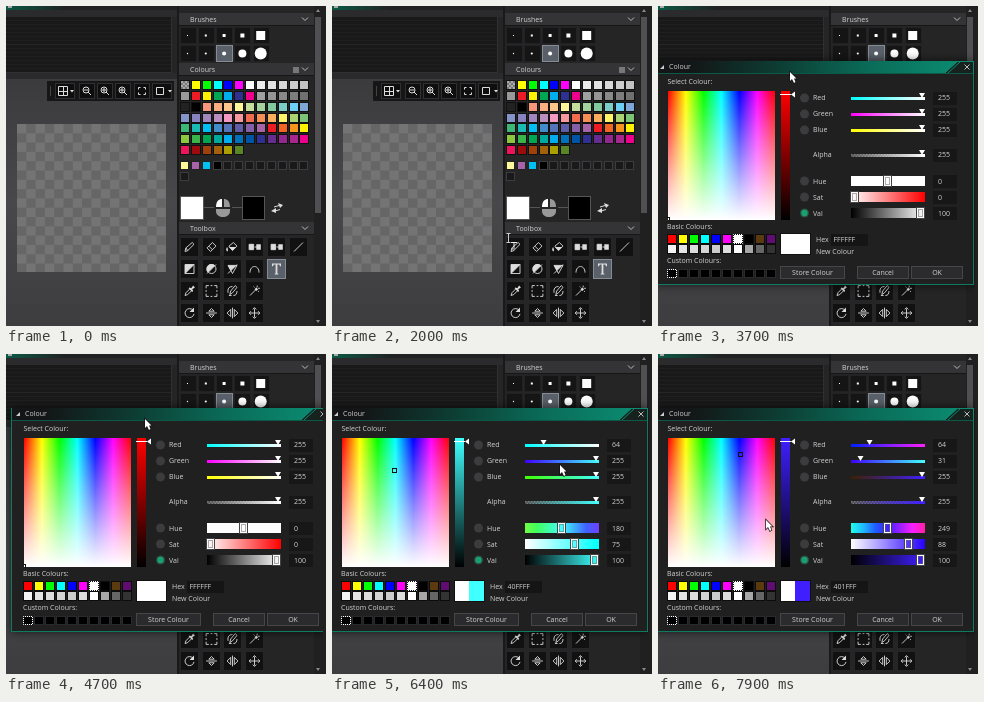
An HTML page with a canvas that plays this animation: 320x320 px, repeating every 8000 ms.

```html
<!DOCTYPE html>
<html lang="en">
<head>
<meta charset="utf-8">
<title>Colour picker</title>
<style>
html, body { margin: 0; width: 100%; height: 100%; overflow: hidden; background: #242425; }
canvas { display: block; width: 320px; height: 320px; }
</style>
</head>
<body>
<canvas id="stage" width="320" height="320"></canvas>
<script>
const g = document.getElementById('stage').getContext('2d');
const LOOP = 8000, STEP = 100;

// [time, x, y] of the pointer tip
const pointer = [
  [1500, 150, 322], [2000, 176, 232], [2300, 177, 232], [2600, 187, 202], [2900, 187, 202],
  [3600, 132, 66], [3700, 132, 66], [4700, 139, 65], [4900, 131, 65], [5100, 131, 65],
  [5400, 238, 96], [5600, 264, 90], [5700, 264, 90], [6100, 212, 90], [6200, 212, 90],
  [6400, 228, 111], [6700, 264, 106], [6800, 264, 106], [7500, 203, 106], [7600, 203, 106],
  [7900, 108, 166]
];
const dialogShift = [[3700, 0, 1], [4700, 8, 0], [4900, 0, 0]];
const OPEN = 2900;

const palette = [
  '- ff0 0f0 0ff 00f f0f fff ebebeb e1e1e1 d7d7d7 ccc c2c2c2',
  '999 ed1c24 fff200 00a651 00aeef 2e3192 ec008c a0a0a0 959595 898989 7d7d7d 707070',
  '222 000 f7977a f9ad81 fdc68a fff79a c4df9b a2d39c 82ca9d 7bcdc8 6ecff6 7ea7d8',
  '8493ca 8882be a187be bc8dbf f49ac2 f6989d f26c4f f68e55 fbaf5c fff467 acd372 7cc576',
  '3bb878 1abbb4 00bff3 438cca 5574b9 605ca8 855fa8 a763a8 ed1c24 f26522 f7941d fff200',
  '8dc73f 39b54a 00a651 00a99d 00aeef 0072bc 0054a5 2e3192 662d91 92278f a7278f ec008c',
  'ed145b 9e0b0f a0410d a36209 aba000 598527'
].map(row => row.split(' '));
const basic = [
  'f00 ff0 0f0 0ff 00f f0f fff 000 5c3a10 600c70',
  'f4f4f4 e4e4e4 ddd d4d4d4 ccc ddd fff a8a8a8 666 333'
].map(row => row.split(' '));

const lerp = (a, b, k) => a + (b - a) * k;

function at(keys, t) {
  if (t <= keys[0][0]) return keys[0].slice(1);
  const i = keys.findIndex(k => k[0] > t);
  if (i < 0) return keys[keys.length - 1].slice(1);
  const [a, b] = [keys[i - 1], keys[i]];
  const k = (t - a[0]) / (b[0] - a[0]);
  return [lerp(a[1], b[1], k), lerp(a[2], b[2], k)];
}

function ramp(t, from, to) {
  return Math.min(1, Math.max(0, (t - from) / (to - from)));
}

function box(x, y, w, h, fill, line) {
  if (fill) { g.fillStyle = fill; g.fillRect(x, y, w, h); }
  if (line) { g.strokeStyle = line; g.lineWidth = 1; g.strokeRect(x + .5, y + .5, w - 1, h - 1); }
}

function text(s, x, y, align = 'left', color = '#d2d2d2') {
  g.font = '7px "Open Sans", sans-serif';
  g.textAlign = align;
  g.fillStyle = color;
  g.fillText(s, x, y);
}

function disc(x, y, r, fill) {
  g.fillStyle = fill;
  g.beginPath();
  g.arc(x, y, r, 0, 7);
  g.fill();
}

function icon(x, y, line, solid, color = '#ddd', size = 1) {
  g.save();
  g.translate(x, y);
  g.scale(size, size);
  g.strokeStyle = g.fillStyle = color;
  g.lineWidth = 1;
  if (line) g.stroke(new Path2D(line));
  if (solid) g.fill(new Path2D(solid));
  g.restore();
}

function gradient(x0, y0, x1, y1, colors) {
  const p = g.createLinearGradient(x0, y0, x1, y1);
  colors.forEach((c, i) => p.addColorStop(i / (colors.length - 1), c));
  return p;
}

function checker(x, y, w, h, size, a, b) {
  box(x, y, w, h, a);
  g.fillStyle = b;
  for (let j = 0; j * size < h - .1; j++)
    for (let i = j % 2; i * size < w - .1; i += 2)
      g.fillRect(x + i * size, y + j * size, Math.min(size, w - i * size), Math.min(size, h - j * size));
}

const rgb = c => `rgb(${c.map(Math.round)})`;

function hsv(h, s, v) {
  return rgb([5, 3, 1].map(n => {
    const k = (n + h / 60 + 12) % 6;
    return 255 * v * (1 - s * Math.max(0, Math.min(k, 4 - k, 1)));
  }));
}

function toHsv([r, gr, b]) {
  const max = Math.max(r, gr, b), d = max - Math.min(r, gr, b);
  const h = !d ? 0 : max === r ? (gr - b) / d : max === gr ? 2 + (b - r) / d : 4 + (r - gr) / d;
  return [(h * 60 + 360) % 360, max ? d / max : 0, max / 255];
}

function header(label, y) {
  box(173, y, 135, 12, '#343436');
  box(173, y + 12, 135, 1, '#161617');
  text(label, 184, y + 9);
  icon(299, y + 6, 'M-3-1.5L0 1.5 3-1.5', '', '#bbb');
}

function workspace() {
  box(0, 0, 320, 320, '#252526');
  box(0, 0, 172, 4, gradient(0, 0, 60, 0, ['#0b5a45', '#202122']));
  box(0, 4, 172, 7, '#2b2b2d');
  box(2, 0, 4, 2, '#aaa');
  box(0, 11, 166, 56, '#19191a');
  g.fillStyle = '#1f1f20';
  for (let y = 14; y < 66; y += 4) g.fillRect(0, y, 165, 1);
  box(0, 38, 165, 1, '#262627');
  box(0, 66, 166, 1, '#303032');
  box(165, 11, 1, 56, '#303032');
  box(0, 67, 171, 6, '#2a2a2c');
  box(0, 73, 171, 247, gradient(0, 73, 0, 320, ['#3b3b3e', '#48484a', '#3d3d40']));
  checker(11, 118, 149, 148, 9.3, '#666667', '#747475');

  box(41, 75, 127, 20, '#161617');
  box(44, 80, 1, 10, '#444');
  [[49, 20], [73, 16], [91, 16], [109, 16], [128, 16], [146, 20]].forEach(([x, w]) => box(x, 77, w, 16, '#0e0e0f', '#303032'));
  icon(57, 85, 'M-4.5-4.5H4.5V4.5H-4.5zM.5-4V4M-4 .5H4');
  icon(66, 85, '', 'M-2-1H2L0 1.5z');
  ['M-3-1H1', 'M-3-1H1M-1-3V1', 'M-3-1H1M-1-3V1'].forEach((sign, i) =>
    icon(81 + i * 18, 85, 'M2-1A3 3 0 1 1-4-1 3 3 0 1 1 2-1M1 1L4 4' + sign));
  icon(136, 85, 'M-3.5-1.5V-3.5H-1.5M1.5-3.5H3.5V-1.5M3.5 1.5V3.5H1.5M-1.5 3.5H-3.5V1.5');
  icon(154, 85, 'M-3.5-3.5H3.5V3.5H-3.5z');
  icon(164, 85, '', 'M-2-1H2L0 1.5z');
}

function sidebar() {
  box(171, 0, 2, 320, '#19191a');
  box(308, 0, 12, 320, '#202021');
  box(309, 11, 6, 196, '#505052');
  icon(312, 5, '', 'M-2 1H2L0-2z', '#888');
  icon(312, 315, '', 'M-2-1H2L0 2z', '#888');

  header('Brushes', 7);
  for (let i = 0; i < 10; i++) {
    const col = i % 5, x = 181.5 + col * 18.3, y = i < 5 ? 29.5 : 47.5;
    box(Math.round(x - 8), y - 8.5, 17, 17, i === 7 ? '#596069' : '#151516', i === 7 ? '#858c95' : '#222224');
    const r = i < 5 ? [.5, 1, 1.5, 2, 4.5][col] : [.7, 1.1, 2, 4, 6][col];
    if (i < 5) box(x - r, y - r, 2 * r, 2 * r, '#fff');
    else disc(x, y, r, '#fff');
  }

  header('Colours', 57);
  icon(290, 64, 'M-3-2H3M-3 0H3M-3 2H3', '', '#bbb');
  palette.forEach((row, j) => row.forEach((c, i) => {
    const x = Math.round(174 + i * 10.85), y = Math.round(74 + j * 10.85);
    box(x, y, 10, 10, '#111');
    if (c === '-') checker(x + 1, y + 1, 8, 8, 2, '#777', '#aaa');
    else box(x + 1, y + 1, 8, 8, '#' + c);
  }));
  const used = ['#fff79a', '#a763a8', '#00bff3', '#000'];
  for (let i = 0; i < 13; i++)
    box(Math.round(174 + i % 12 * 10.85), i < 12 ? 155 : 166, 9, 9, used[i] || '#19191a', i < 3 ? '#222' : '#3c3c3e');

  box(198, 201, 38, 1, '#555');
  box(174, 190, 24, 24, '#fff', '#555');
  box(236, 190, 23, 24, '#000', '#555');
  box(208, 192, 18, 20, '#252526');
  icon(217, 202, '', 'M-1-9V-1H-7C-7-7-4-9-1-9z', '#fff');
  icon(217, 202, '', 'M1-9V-1H7C7-7 4-9 1-9zM-7 1H7V3C7 11-7 11-7 3z', '#999');
  icon(271, 202, 'M-3-1L2-2.5M-2 3L3 1.5', 'M1-5L6-3 3 0zM-1 0L-6 3-1 5z');

  header('Toolbox', 216);
  toolbox();
}

function toolbox() {
  const halfCut = 'M-5 5L5-5';
  const replace = ['M-6-3H-1V3H-6zM0 0H3', 'M-6-3H-1V3H-6zM2-3H7V3H2z'];
  const tools = [
    ['M-5 5L-4 1 3-5 5-3-2 4zM-4 1L-2 4'],
    ['M-5 1L1-5 5-1-1 5zM-3-1L1 3'],
    ['M-4-1L1-5 5-1 0 4z', 'M-4 0L4 0 0 4zM-6 0Q-4 4-6 5Q-8 3-6 0'],
    replace, replace,
    ['M-5 5L5-5'],
    ['M-5-5H5V5H-5z' + halfCut, 'M-5-5H5L-5 5z'],
    ['M5 0A5 5 0 1 1-5 0 5 5 0 1 1 5 0' + halfCut, 'M-4 4A5 5 0 0 1 4-4z'],
    ['M-5-4H5L0 5z' + halfCut, 'M-5-4H4L-2 2z'],
    ['M-5 4C-5-5 5-5 5 4'],
    ['', 'M-5-6H5V-3H4L3-5H1V5L2 5V6H-2V5L-1 5V-5H-3L-4-3H-5z'],
    ['M-5 5L-4 2 1-3 3-1-2 4z', 'M0-4L2-3 4-6 6-4 3-2 4 0 3 1-1-3z'],
    ['M-6-3V-6H-3M-1-6H1M3-6H6V-3M6-1V1M6 3V6H3M1 6H-1M-3 6H-6V3M-6 1V-1'],
    ['M-5 2Q-6-5 0-5M-4 5H-1M5 0Q5 5 1 5M-3 4L-2 0 3-6 5-4 0 2z'],
    ['M-5 5L2-2M3-6V-4M6-3H4M-1-5L0-4M5 1L4 0', 'M0-2L2-4 4-2 2 0z'],
    ['M4-3A5 5 0 1 0 5 1', 'M5-6V-1H0z'],
    ['M-6 0H6M-3-2L0-5 3-2zM-3 2L0 5 3 2z'],
    ['M0-6V6M-2-4L-6 0-2 4zM2-4L6 0 2 4z'],
    ['M-5 0H5M0-5V5M-2-4L0-6 2-4M-2 4L0 6 2 4M-4-2L-6 0-4 2M4-2L6 0 4 2']
  ];
  const rows = [6, 5, 4, 4];
  let n = 0;
  rows.forEach((count, j) => {
    for (let i = 0; i < count; i++, n++) {
      const x = Math.round(183 + i * 21.7), y = 241 + j * 22, on = n === 10;
      box(x - 9, y - 10, 19, 20, on ? '#596069' : '#111112', on ? '#858c95' : '#262628');
      icon(x + .5, y, tools[n][0], tools[n][1], '#ddd', .9);
    }
  });
}

function slider(label, y, value, shown, colors, isAlpha) {
  text(label, 155, y + 2);
  if (isAlpha) checker(193, y - 1, 74, 3, 1.5, '#444', '#777');
  box(193, y - 1, 74, 3, gradient(193, 0, 267, 0, colors));
  icon(194 + 70 * value, y - 2, '', 'M-3-3H3L0 2z', '#fff');
  box(275, y - 6, 24, 13, '#171718');
  text(shown, 280, y + 2);
}

function bar(label, y, knob, shown, colors) {
  text(label, 155, y + 3);
  box(193, y - 5, 74, 10, gradient(193, 0, 267, 0, colors));
  box(knob - 5, y - 6, 9, 12, '', '#444');
  box(knob - 4, y - 5, 7, 10, '', '#fff');
  box(knob - 3, y - 4, 5, 8, '', '#6668');
  box(275, y - 6, 24, 13, '#171718');
  text(shown, 280, y + 3);
}

function radio(y, on) {
  disc(146.5, y, 4.5, on ? '#2c4f42' : '#3c3c3e');
  if (on) disc(146.5, y, 3.2, '#1aa070');
}

function button(label, x, w) {
  box(x, 259, w, 13, '#2b2b2d', '#464648');
  text(label, x + w / 2, 268, 'center');
}

function dialog(color) {
  const [r, gr, b] = color, [h, s, v] = toHsv(color);
  const now = rgb(color), hue = d => hsv((h + d + 360) % 360, s, v);

  g.save();
  g.shadowColor = '#000a';
  g.shadowBlur = 9;
  box(-3, 54, 319, 224, '#0e7a60');
  g.restore();
  box(-2, 55, 317, 222, '#202021');
  box(-2, 54, 318, 12, gradient(30, 0, 300, 0, ['#131516', '#0d3d33', '#0a6b58', '#0b8a70']));
  icon(0, 0, 'M288 66L300 55', 'M288 66L300 55H315V66z', '#17211e');
  icon(0, 0, 'M290 66L302 55', '', '#0b8a70');
  box(-2, 66, 317, 1, '#0b5a48');
  icon(4, 60, '', 'M-2 2H2V-2z', '#ccc');
  text('Colour', 11, 62);
  icon(309, 60, 'M-2.5-2.5L2.5 2.5M2.5-2.5L-2.5 2.5', '', '#bbb');

  text('Select Colour:', 9.5, 77);
  const wheel = [0, 60, 120, 180, 240, 300, 360].map(a => hsv(a, 1, 1));
  box(10, 84, 107, 129, gradient(10, 0, 117, 0, wheel));
  box(10, 84, 107, 129, gradient(0, 84, 0, 213, ['#fff0', '#fff']));
  const mx = 10 + 106 * h / 360, my = 84 + 128 * (1 - s);
  g.save();
  g.beginPath();
  g.rect(9, 83, 109, 131);
  g.clip();
  box(Math.round(mx) - 3, Math.round(my) - 2, 5, 5, '', '#111');
  g.restore();
  box(123, 84, 9, 129, gradient(0, 84, 0, 213, [hsv(h, s || 1, 1), '#000']));
  box(122, 87, 11, 1, '#fff');
  icon(134, 87.5, '', 'M-1 0L3-3V3z', '#fff');

  [91, 107, 123, 174, 190, 206].forEach(y => radio(y, y === 206));
  slider('Red', 91, r / 255, Math.round(r), [rgb([0, gr, b]), rgb([255, gr, b])]);
  slider('Green', 107, gr / 255, Math.round(gr), [rgb([r, 0, b]), rgb([r, 255, b])]);
  slider('Blue', 123, b / 255, Math.round(b), [rgb([r, gr, 0]), rgb([r, gr, 255])]);
  slider('Alpha', 148, 1, 255, [now.replace(')', ',0)'), now], true);
  bar('Hue', 174, 230, Math.round(h), [-75, -50, -25, 0, 25, 50, 75].map(hue));
  bar('Sat', 190, Math.round(197 + 62 * s), Math.round(s * 100), [hsv(h, 0, v), hsv(h, 1, v)]);
  bar('Val', 206, 263, Math.round(v * 100), ['#000', hsv(h, s, 1)]);

  text('Basic Colours:', 9, 222);
  basic.forEach((row, j) => row.forEach((c, i) => box(9 + i * 11, 227 + j * 10, 10, 10, '#' + c, '#0c0c0c')));
  text('Custom Colours:', 9, 256);
  for (let i = 0; i < 10; i++) box(9 + i * 11, 262, 10, 9, '#000', '#2a2a2c');
  g.setLineDash([1, 1]);
  g.lineDashOffset = .5;
  box(9, 262, 10, 9, '', '#fff');
  box(75, 227, 10, 10, '', '#fff');
  g.setLineDash([]);

  box(122, 226, 31, 22, '#111');
  box(123, 227, 14, 20, '#fff');
  box(137, 227, 15, 20, now);
  text('Hex', 158, 235);
  box(173, 227, 37, 12, '#151516');
  text(color.map(c => Math.round(c).toString(16).padStart(2, '0')).join('').toUpperCase(), 175.5, 235);
  text('New Colour', 158, 247);

  button('Store Colour', 122, 65);
  button('Cancel', 199, 52);
  button('OK', 253, 52);
}

function arrow(x, y) {
  g.save();
  g.translate(Math.round(x), Math.round(y));
  const shape = new Path2D('M0 0V9L2 7 4 11 5.5 10 4 6.5H6.5z');
  g.strokeStyle = '#111';
  g.lineWidth = 1.4;
  g.stroke(shape);
  g.fillStyle = '#fff';
  g.fill(shape);
  g.restore();
}

function textCursor(x, y) {
  icon(Math.round(x) + .5, Math.round(y), 'M-2-4.5H2M0-4V4M-2 4.5H2', '', '#ccc');
  icon(Math.round(x) + 6, Math.round(y) + 7, 'M-3-2.5H3M0-2V4', '', '#eee');
}

function draw(t) {
  workspace();
  sidebar();
  if (t >= OPEN) {
    const red = lerp(255, 64, ramp(t, 5700, 6100));
    const green = lerp(255, 31, ramp(t, 6800, 7500));
    const [dx, dy] = at(dialogShift, t).map(Math.round);
    g.save();
    g.translate(dx, dy);
    dialog([red, green, 255]);
    g.restore();
  }
  box(317, 0, 3, 320, '#202021');
  const [x, y] = at(pointer, t);
  if (t >= OPEN) arrow(x, y);
  else if (t >= pointer[0][0]) textCursor(x, y);
}

let shown = -1;
function tick() {
  const t = Math.floor(performance.now() % LOOP / STEP) * STEP;
  if (t !== shown) draw(shown = t);
  requestAnimationFrame(tick);
}
tick();
</script>
</body>
</html>
```
